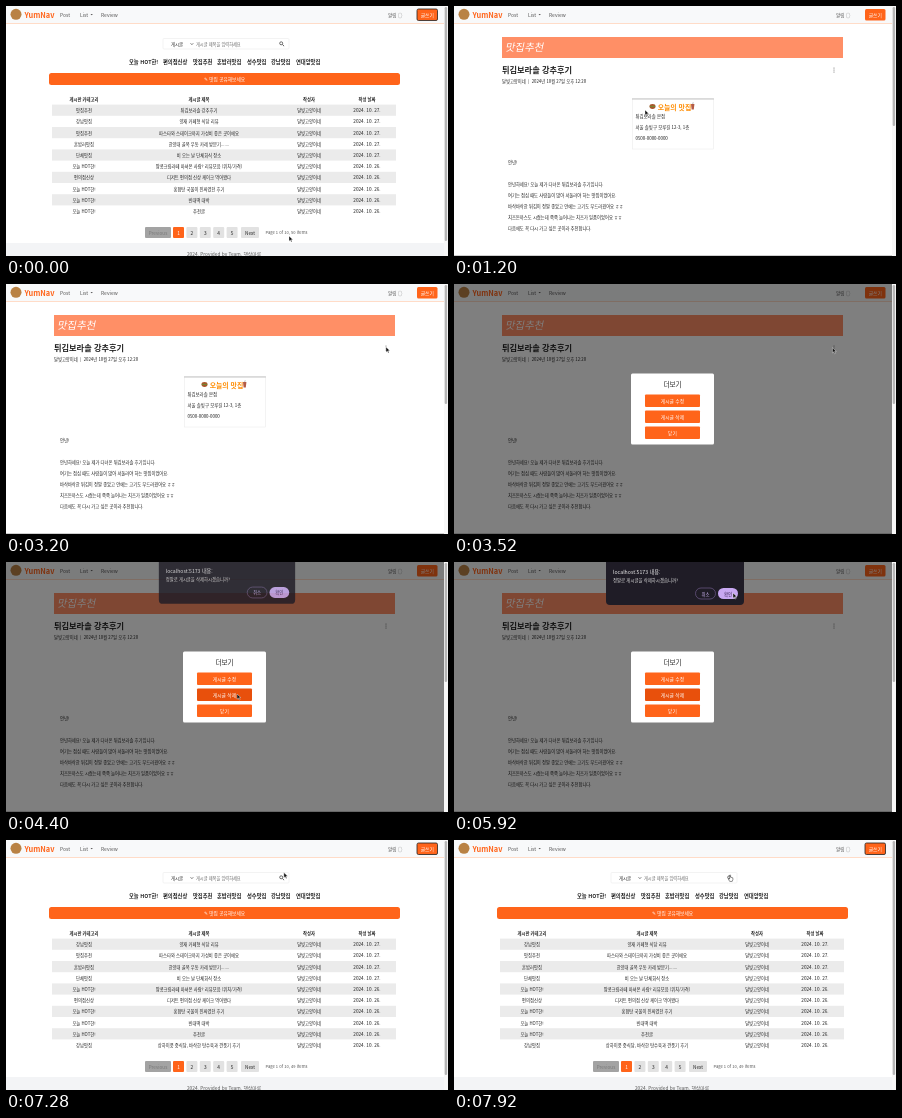
Write an HTML page that moves like this. It is 442x250 px and loops after 8 s.

```html
<!DOCTYPE html>
<html lang="ko">
<head>
<meta charset="utf-8">
<title>맛집 게시판</title>
<style>
html, body { margin: 0; width: 100%; height: 100%; overflow: hidden; background: #fff; }
svg { display: block; width: 100vw; height: 100vh; }
text { font-family: "Noto Sans CJK KR", "Noto Sans CJK", "Noto Sans", sans-serif; dominant-baseline: central; white-space: pre; }
</style>
</head>
<body>
<svg id="stage" viewBox="0 0 442 250"></svg>
<script>
const ORANGE = '#ff641a', INK = '#222';
const LOOP = 8000;

const rect = (x, y, w, h, fill, extra = '') =>
  `<rect x="${x}" y="${y}" width="${w}" height="${h}" fill="${fill}" ${extra}/>`;
const text = (x, y, size, str, { fill = INK, weight = 400, anchor = 'start', extra = '' } = {}) =>
  `<text x="${x}" y="${y}" font-size="${size}" fill="${fill}" font-weight="${weight}" text-anchor="${anchor}" ${extra}>${str}</text>`;
const middle = (x, y, size, str, opts) => text(x, y, size, str, { anchor: 'middle', ...opts });
const path = (d, stroke, width = 0.7, fill = 'none') =>
  `<path d="${d}" stroke="${stroke}" stroke-width="${width}" fill="${fill}"/>`;
const button = (x, y, w, h, fill, label, size = 4.6, opts = {}, radius = 1) =>
  rect(x, y, w, h, fill, `rx="${radius}"`) + middle(x + w / 2, y + h / 2, size, label, { fill: '#fff', ...opts });
const group = (id, content) => `<g id="${id}">${content}</g>`;

const header = () =>
  rect(0, 0, 438, 17, '#f8f9fa') + rect(0, 17, 438, 0.6, '#ffc5a3') +
  '<circle cx="10" cy="8.3" r="5.5" fill="#b98244"/>' +
  text(18.5, 8.3, 7.4, 'YumNav', { fill: ORANGE, weight: 700 }) +
  text(54, 8.6, 5, 'Post', { fill: '#555' }) +
  text(74, 8.6, 5, 'List', { fill: '#555' }) + path('M84.5 8l1.2 1.3 1.2-1.3z', 'none', 0, '#555') +
  text(95, 8.6, 5, 'Review', { fill: '#555' }) +
  text(382, 8.6, 4.6, '알림 ○', { fill: '#555' }) +
  button(411, 3, 20.5, 11.5, ORANGE, '글쓰기', 4.8, {}, 1.5);

const scrollbar = height =>
  rect(438, 0, 4, 250, '#f7f7f7') + rect(438.7, 1, 2.4, height, '#b5b5b5', 'rx="1.2"');

const posts = [
  ['맛집추천', '튀김보라솔 강추후기', 27],
  ['강남맛집', '양재 카페형 식당 리뷰', 27],
  ['맛집추천', '파스타와 스테이크까지 가성비 좋은 곳이에요', 27],
  ['혼밥러맛집', '한양대 골목 우동 카레 방문기.......', 27],
  ['단체맛집', '비 오는 날 단체회식 장소', 27],
  ['오늘 HOT한!', '땅콩크림라떼 마셔본 사람? 리뷰모음 (위치/가격)', 26],
  ['편의점신상', '디저트 편의점 신상 케이크 먹어봤다', 26],
  ['오늘 HOT한!', '홍합탕 국물이 진짜였던 후기', 26],
  ['오늘 HOT한!', '빈대떡 대박', 26],
  ['오늘 HOT한!', '추천글', 26],
  ['강남맛집', '상하이풍 중식당, 바삭한 탕수육과 깐풍기 후기', 26],
];
const columns = [78, 193, 303, 361];

function table(first) {
  const heads = ['게시판 카테고리', '게시글 제목', '작성자', '작성 날짜'];
  const rows = posts.slice(first, first + 10).map(([category, title, day], i) => {
    const y = 104.2 + i * 11.2;
    const cells = [category, title, '달빛고양이네', `2024. 10. ${day}.`];
    return (i % 2 ? '' : rect(46, y - 5.6, 344, 11.2, '#ebebeb')) +
      cells.map((cell, c) => middle(columns[c], y, c === 3 ? 4.7 : 4.3, cell, { weight: 500 })).join('');
  });
  return heads.map((head, c) => middle(columns[c], 93, 4.3, head, { weight: 700 })).join('') + rows.join('');
}

function listPage(first, items) {
  const categories = [[123, '오늘 HOT한!'], [157, '편의점신상'], [187, '맛집추천'], [211, '혼밥러맛집'],
    [241, '성수맛집'], [265, '강남맛집'], [290, '연대앞맛집']];
  const pages = [1, 2, 3, 4, 5].map(n =>
    button(153.6 + n * 13.4, 221, 11, 11, n === 1 ? ORANGE : '#e2e2e2', n, 4.8,
      { fill: n === 1 ? '#fff' : INK, weight: 500 })).join('');
  return rect(0, 0, 442, 250, '#fff') + header() +
    rect(411, 3, 20.5, 11.5, 'none', 'rx="1.5" stroke="#222" stroke-width=".8"') +
    rect(157, 32.5, 126, 10.5, '#fff', 'rx="1" stroke="#e6e6e6" stroke-width=".5"') +
    text(165, 38, 4.3, '게시글', { weight: 500 }) + path('M184.5 37.2l1.4 1.5 1.4-1.5', '#333', 0.6) +
    text(190, 38, 4.2, '게시글 제목을 입력하세요', { fill: '#666' }) +
    '<circle cx="275.2" cy="37.3" r="1.5" fill="none" stroke="#333" stroke-width=".7"/>' +
    path('M276.4 38.5l1.7 1.7', '#333', 0.8) +
    categories.map(([x, name]) => text(x, 56.3, 5.3, name, { weight: 700 })).join('') +
    button(43, 67, 351, 12, ORANGE, '✎ 맛집 공유해보세요', 4.7, { weight: 500 }, 2.5) +
    table(first) +
    button(139, 221, 26, 11, '#a3a3a3', 'Previous', 4.6, { fill: '#777' }) + pages +
    button(235, 221, 18, 11, '#e2e2e2', 'Next', 4.7, { fill: INK, weight: 500 }) +
    text(259.5, 226.3, 4.1, `Page 1 of 10, ${items} items`, { fill: '#555' }) +
    rect(0, 237, 438, 13, '#f3f4f6') +
    middle(218, 247, 4.8, '2024. Provided by Team. 햇살마루', { fill: '#555' }) +
    scrollbar(234);
}

function detailPage() {
  const body = [
    '안녕하세요! 오늘 제가 다녀온 튀김보라솔 후기입니다.',
    '여기는 점심 때도 사람들이 많아 서둘러야 하는 맛집이었어요.',
    '바삭바삭한 튀김이 정말 좋았고 안에는 고기도 부드러웠어요 ㅎㅎ',
    '치즈돈까스도 시켰는데 쭉쭉 늘어나는 치즈가 일품이었어요 ㅎㅎ',
    '다음에도 꼭 다시 가고 싶은 곳이라 추천합니다.',
  ];
  return rect(0, 0, 442, 250, '#fff') + header() +
    rect(48, 31, 341, 21, '#ff8f66') +
    text(0, 0, 10.4, '맛집추천', { fill: '#fff', weight: 500, extra: 'transform="translate(52 41) skewX(-12)"' }) +
    text(48, 63, 8.2, '튀김보라솔 강추후기', { weight: 700 }) +
    text(48, 75, 4.3, '달빛고양이네  |  2024년 10월 27일 오후 12:20', { weight: 500 }) +
    [62, 64, 66].map(y => `<circle cx="380" cy="${y}" r=".5" fill="#555"/>`).join('') +
    rect(178.5, 93, 81, 50, '#fff', 'stroke="#e8e8e8" stroke-width=".5"') + rect(178, 92.6, 82, 0.7, '#aaa') +
    '<ellipse cx="198.5" cy="100.5" rx="3" ry="2.4" fill="#a8552a"/>' + path('M195.8 100.4h5.4', '#5f9a36', 0.8) +
    middle(220.5, 100.5, 6.9, '오늘의 맛집', { fill: '#ff8c00', weight: 700 }) +
    path('M237 98h3.4l-.6 5.5h-2.2z', 'none', 0, '#b55b45') + path('M238.7 98l.5-1.7', '#777', 0.5) +
    ['튀김보라솔 본점', '서울 솔빛구 모루길 12-3, 1층', '0500-0000-0000']
      .map((line, i) => text(181.5, 110 + i * 11, 4.4, line, { weight: 500 })).join('') +
    text(54, 156, 4.4, '안녕!', { weight: 500 }) +
    body.map((line, i) => text(54, 178 + i * 11, 4.3, line, { weight: 500 })).join('') +
    rect(0, 249.3, 438, 0.7, '#bbb') + scrollbar(119);
}

const modal = () =>
  rect(0, 0, 438, 250, '#000', 'opacity=".5"') + rect(177, 89.5, 83, 71, '#fff', 'rx="1.5"') +
  middle(218.5, 99.5, 6.6, '더보기', { weight: 500 }) +
  ['게시글 수정', '게시글 삭제', '닫기'].map((label, i) =>
    `<g class="option">${button(191, 110.5 + i * 16, 55, 12.5, ORANGE, label, 4.8, { weight: 500 })}</g>`).join('');

const dialog = (message, cancel) =>
  path('M152 0H290V39q0 4-4 4H156q-4 0-4-4z', 'none', 0, '#1f1c26') +
  text(159, 9, 5.2, 'localhost:5173 내용:', { fill: '#eee' }) +
  text(159, 18, 4.4, message, { fill: '#ddd' }) +
  (cancel ? rect(241.5, 26, 20, 11, 'none', 'rx="5.5" stroke="#6d5a88" stroke-width=".7"') +
    middle(251.5, 31.5, 4.4, '취소', { fill: '#cbb2f0' }) : '') +
  button(264, 26, 20, 11, '#c8a8f2', '확인', 4.4, { fill: '#36204f' }, 5.5);

const cursor =
  group('arrow', path('M0 0v5.2l1.3-1.1.9 1.9.9-.4-.9-1.9h1.7z', '#fff', 0.4, '#111')) +
  group('hand', path('M-.4.2q.6-.6 1 0v2l2.2.6q.5 2-.6 3.6H-.3L-1.8 3.8q.5-.7 1.4.2z', '#222', 0.5, '#fff'));

const stage = document.getElementById('stage');
stage.innerHTML =
  group('listBefore', listPage(0, 50)) + group('listAfter', listPage(1, 49)) + group('detail', detailPage()) +
  group('modal', modal()) +
  group('confirm', dialog('정말로 게시글을 삭제하시겠습니까?', true)) +
  group('notice', dialog('게시글이 삭제되었습니다.', false)) +
  group('cursor', cursor);

const part = id => document.getElementById(id);
const show = (id, on) => part(id).setAttribute('visibility', on ? 'visible' : 'hidden');
const options = [...document.querySelectorAll('.option')];
const clamp = v => Math.max(0, Math.min(1, v));
const ease = v => v * v * (3 - 2 * v);

// Each move: start, end, destination.
const moves = [[60, 860, 191, 104], [1780, 2560, 380, 63], [3480, 4160, 231, 132], [4520, 5260, 279, 31], [7120, 7500, 276, 35]];

function cursorAt(t) {
  let x = 283, y = 230;
  for (const [start, end, toX, toY] of moves) {
    const k = ease(clamp((t - start) / (end - start)));
    x += (toX - x) * k;
    y += (toY - y) * k;
  }
  return [x, y];
}

function openDialog(id, t, start, end) {
  const k = clamp((t - start) / 160);
  const scale = 0.96 + 0.04 * k;
  show(id, t >= start && t < end);
  part(id).setAttribute('opacity', 0.4 + 0.6 * k);
  part(id).setAttribute('transform', `translate(${221 * (1 - scale)} ${-2 * (1 - k)}) scale(${scale})`);
}

function draw(t) {
  const [x, y] = cursorAt(t);
  show('listBefore', t < 1200);
  show('detail', t >= 1200 && t < 7000);
  show('listAfter', t >= 7000);
  show('modal', t >= 3360 && t < 6160);
  openDialog('confirm', t, 4290, 6080);
  openDialog('notice', t, 6240, 6920);
  options.forEach((option, i) => {
    const top = 110.5 + i * 16;
    const hovered = x > 191 && x < 246 && y > top && y < top + 12.5;
    const active = t > 4160 ? i === 1 : hovered;
    option.firstChild.setAttribute('fill', active ? '#e8500c' : ORANGE);
  });
  const pointing = t >= 7400 || (t > 780 && t < 1200);
  show('arrow', !pointing);
  show('hand', pointing);
  part('cursor').setAttribute('transform', `translate(${x} ${y})`);
}

function tick(now) {
  draw(now % LOOP);
  requestAnimationFrame(tick);
}
draw(0);
requestAnimationFrame(tick);
</script>
</body>
</html>
```
